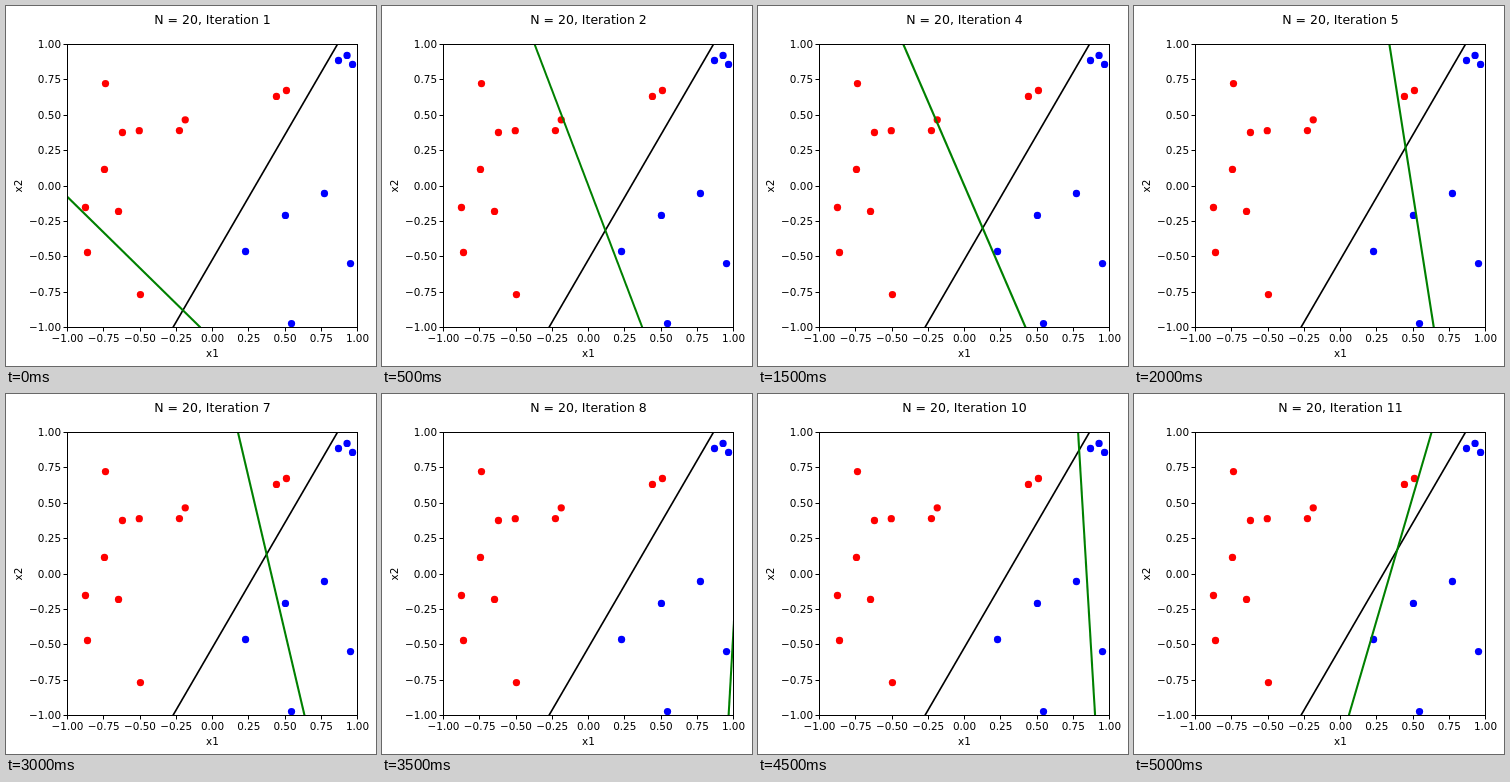
Write an HTML page with a canvas that moves like this. It is 370 px wide and 360 px high and loops after 5.5 s.

```html
<!DOCTYPE html>
<html>
<head>
<meta charset="utf-8">
<title>Perceptron learning</title>
<style>
html, body { margin: 0; width: 100%; height: 100%; overflow: hidden; background: #fff; }
canvas { display: block; }
</style>
</head>
<body>
<canvas id="stage" width="370" height="360"></canvas>
<script>
const ctx = document.getElementById('stage').getContext('2d');
const STEP = 500;
const PT = 75 / 72; // pixels per point
const LEFT = 61.5, TOP = 38.5, WIDTH = 290, HEIGHT = 283;
const BOTTOM = TOP + HEIGHT, MID = LEFT + WIDTH / 2;

const px = x => LEFT + (x + 1) / 2 * WIDTH;
const py = y => TOP + (1 - y) / 2 * HEIGHT;
const snap = v => Math.floor(v) + .5;

// The true boundary decides each point's class
const trueX = y => .294 + .567 * y;
const label = ([x, y]) => x < trueX(y) ? -1 : 1;

const points = [
  [.928, .923], [-.505, .391], [.51, .675], [-.188, .468], [.441, .633],
  [.869, .887], [.545, -.972], [.966, .859], [.772, -.053], [.503, -.208],
  [.228, -.463], [.952, -.548], [-.738, .724], [-.621, .378], [-.228, .392],
  [-.745, .117], [-.876, -.152], [-.648, -.18], [-.862, -.47], [-.497, -.767]
];

// Misclassified point chosen in each iteration
const picks = [0, 1, 2, 0, 3, 4, 5, 2, 0, 2, 6];

// Perceptron rule: w += label * (1, x, y)
function learn(iterations) {
  const w = [0, 0, 0];
  for (const pick of picks.slice(0, iterations)) {
    const p = points[pick];
    [1, ...p].forEach((v, k) => w[k] += label(p) * v);
  }
  return w;
}

function line(x1, y1, x2, y2, color, width) {
  ctx.strokeStyle = color;
  ctx.lineWidth = width;
  ctx.beginPath();
  ctx.moveTo(x1, y1);
  ctx.lineTo(x2, y2);
  ctx.stroke();
}

function boundary(xAt, color, width) {
  line(px(xAt(-1)), BOTTOM, px(xAt(1)), TOP, color, width * PT);
}

function dot(p) {
  ctx.fillStyle = label(p) < 0 ? '#f00' : '#00f';
  ctx.beginPath();
  ctx.arc(px(p[0]), py(p[1]), 3.5 * PT, 0, 2 * Math.PI);
  ctx.fill();
}

function text(str, x, y, size = 10, align = 'center') {
  ctx.font = size * PT + 'px "DejaVu Sans", sans-serif';
  ctx.textAlign = align;
  ctx.fillStyle = '#000';
  ctx.fillText(str, x, y);
}

function axes() {
  ctx.strokeStyle = '#000';
  ctx.lineWidth = 1;
  ctx.strokeRect(LEFT, TOP, WIDTH, HEIGHT);
  for (let v = -1; v <= 1; v += .25) {
    const value = v.toFixed(2).replace('-', '\u2212');
    const x = snap(px(v)), y = snap(py(v));
    line(x, BOTTOM, x, BOTTOM + 4, '#000', 1);
    line(LEFT - 4, y, LEFT, y, '#000', 1);
    text(value, px(v), 335.5);
    text(value, 55, Math.round(py(v) + 3.5), 10, 'right');
  }
  text('x1', MID, 351);
  ctx.save();
  ctx.translate(16, 180);
  ctx.rotate(-Math.PI / 2);
  text('x2', 0, 0);
  ctx.restore();
}

function draw(iteration) {
  const [bias, wx, wy] = learn(iteration);
  ctx.fillStyle = '#fff';
  ctx.fillRect(0, 0, 370, 360);
  ctx.save();
  ctx.beginPath();
  ctx.rect(LEFT, TOP, WIDTH, HEIGHT);
  ctx.clip();
  boundary(trueX, '#000', 1.5);
  points.forEach(dot);
  boundary(y => -(bias + wy * y) / wx, '#008000', 2);
  ctx.restore();
  axes();
  text('N = 20, Iteration ' + iteration, MID, 18, 12);
}

function frame() {
  draw(Math.floor(performance.now() / STEP) % picks.length + 1);
  requestAnimationFrame(frame);
}
frame();
</script>
</body>
</html>
```
